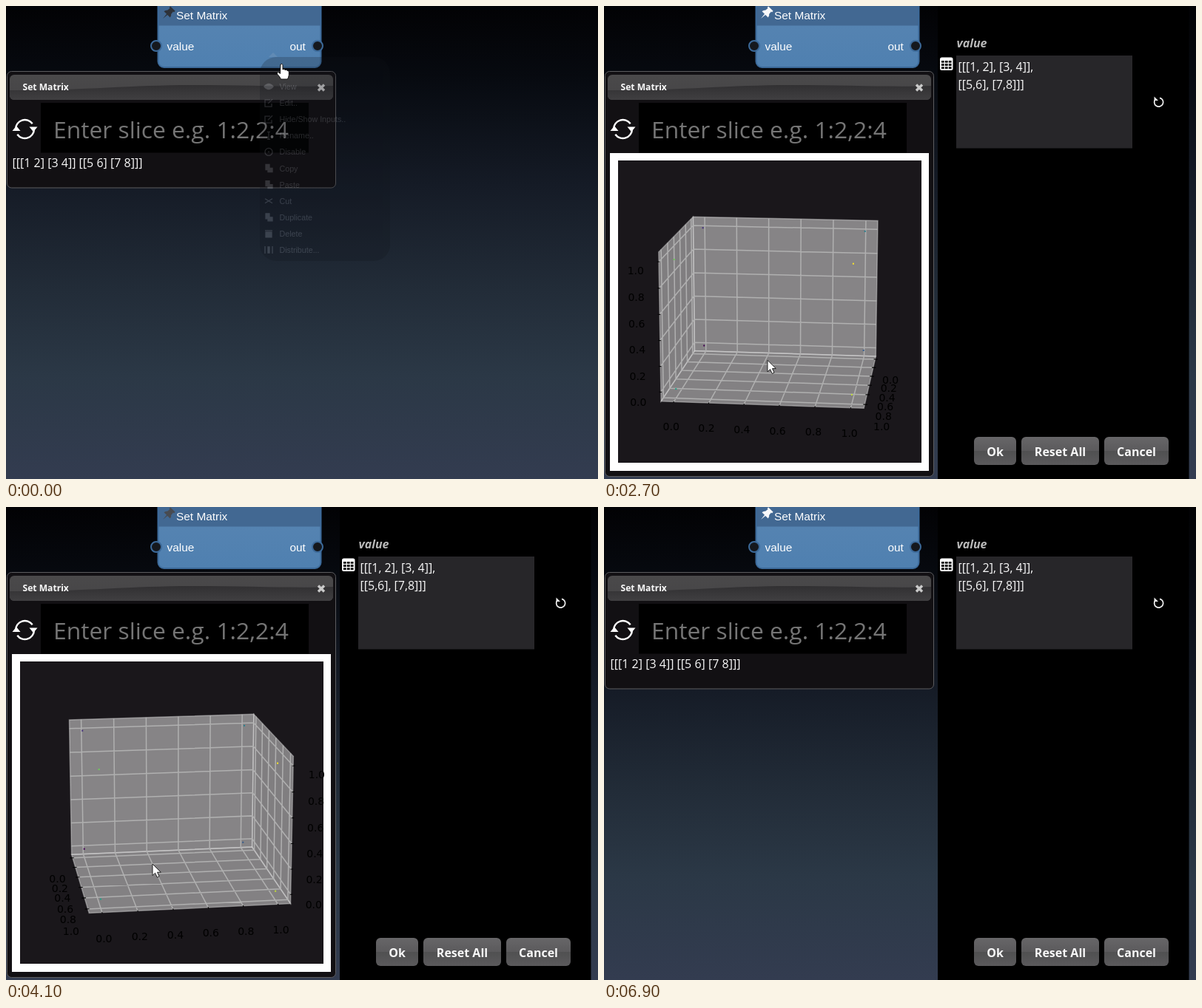
An HTML page that plays this animation: 800 px wide and 640 px high, repeating every 7000 ms.

```html
<!DOCTYPE html>
<html lang="en">
<head>
<meta charset="utf-8">
<title>Set Matrix</title>
<style>
html, body { margin: 0; width: 100%; height: 100%; overflow: hidden; background: #000; }
svg { display: block; width: 800px; height: 640px; }
text { white-space: pre; }
.ui { font: 16px "Open Sans", "Noto Sans", sans-serif; fill: #f8f8f8; }
.bold { font-weight: 700; }
.name { font-style: italic; fill: #b9b9b9; }
.node { font: 15.4px "Liberation Sans", Arial, sans-serif; fill: #fff; }
.menu { font: 10.7px "Liberation Sans", Arial, sans-serif; fill: #b4bac6; }
.tick { font: 14px "DejaVu Sans", sans-serif; fill: #000; text-anchor: middle; }
.mid { text-anchor: middle; }
</style>
</head>
<body>
<svg viewBox="0 0 800 640">
  <defs>
    <linearGradient id="sky" x2="0" y2="1">
      <stop stop-color="#020204"/><stop offset=".15" stop-color="#070a10"/>
      <stop offset=".38" stop-color="#151b26"/><stop offset=".6" stop-color="#222c38"/>
      <stop offset=".78" stop-color="#2b3846"/><stop offset="1" stop-color="#333c50"/>
    </linearGradient>
    <linearGradient id="body" x2="0" y2="1">
      <stop stop-color="#5985b2"/><stop offset="1" stop-color="#4f80b0"/>
    </linearGradient>
    <linearGradient id="bar" x2="0" y2="1">
      <stop stop-color="#4a494a"/><stop offset="1" stop-color="#464547"/>
    </linearGradient>
    <linearGradient id="shade" x2="0" y2="1">
      <stop stop-color="#313032"/><stop offset="1" stop-color="#403f41"/>
    </linearGradient>
    <linearGradient id="btn" x2="0" y2="1">
      <stop stop-color="#676668"/><stop offset=".5" stop-color="#5b5a5c"/>
      <stop offset=".5" stop-color="#505051"/><stop offset="1" stop-color="#5b5a5c"/>
    </linearGradient>
    <clipPath id="barClip"><rect x="5" y="93" width="437" height="34" rx="6"/></clipPath>
  </defs>

  <rect width="800" height="640" fill="url(#sky)"/>

  <g>
    <rect x="205.5" y="-12" width="220" height="95" rx="8" fill="url(#body)"/>
    <path d="M205.5 0h220v26.5h-220z" fill="#426892"/>
    <rect x="205.5" y="-12" width="220" height="95" rx="8" fill="none" stroke="#3c6a9a" stroke-width="2"/>
    <g fill="#15181d" stroke="#3c6a9a" stroke-width="2">
      <circle cx="203" cy="54" r="7"/><circle cx="421" cy="54" r="7"/>
    </g>
    <g id="pin" transform="translate(219 10) rotate(45) scale(.9)">
      <path d="M-5 -10H5V-7.5H3.4L4 -2.5Q6.5 -1 6.5 2.2H.9L0 11L-.9 2.2H-6.5Q-6.5 -1 -4 -2.5L-3.4 -7.5H-5Z"/>
    </g>
    <text class="node" x="230" y="17.5">Set Matrix</text>
    <text class="node" x="217.5" y="60">value</text>
    <text class="node" x="383.5" y="60">out</text>
  </g>

  <g>
    <rect id="frame" x="1.5" y="88.5" width="444" height="157.5" rx="6" fill="#121013" stroke="#5c5c5f"/>
    <g clip-path="url(#barClip)">
      <rect x="5" y="93" width="437" height="34" fill="url(#bar)"/>
      <path d="M5 114C110 114 170 107 250 107S390 110 442 108V127H5Z" fill="url(#shade)"/>
    </g>
    <text class="ui bold" x="22.5" y="114.3" style="font-size:12.1px">Set Matrix</text>
    <path d="M422 106.5l8 8m0-8l-8 8" stroke="#c9c9c9" stroke-width="3.4"/>
    <rect x="47" y="131" width="362" height="67.5" fill="#000"/>
    <text class="ui" x="64" y="178.5" style="font-size:31.8px;fill:#757575">Enter slice e.g. 1:2,2:4</text>
    <g id="refresh">
      <path d="M13 166.5A12.5 12.5 0 0 1 35.700 159.300M38 166.500A12.500 12.500 0 0 1 15.300 173.700" fill="none" stroke="currentColor" stroke-width="2.4"/>
      <path d="M8.500 169h11l-5.500-6.800zM31.500 163.500h11l-5.500 6.800z" fill="currentColor"/>
    </g>
    <text id="result" class="ui" x="8.5" y="218">[[[1 2] [3 4]] [[5 6] [7 8]]]</text>
    <g id="plot">
      <rect id="paper" x="8" y="199" width="431" height="430" fill="#fff"/>
      <rect x="19" y="209" width="410" height="409" fill="#1a171b"/>
    </g>
  </g>

  <g id="panel">
    <rect x="451" width="339.5" height="640"/>
    <text class="ui bold name" x="476.5" y="56">value</text>
    <rect x="476" y="67" width="238" height="125.5" fill="#272629"/>
    <text class="ui" x="478.5" y="87.5">[[[1, 2], [3, 4]],</text>
    <text class="ui" x="478.5" y="112">[[5,6], [7,8]]]</text>
    <rect x="454" y="69.5" width="17.5" height="17.5" rx="2.5" fill="#fff"/>
    <path id="cells"/>
    <path d="M745.5 125.8A6 6 0 1 0 751 124.300" fill="none" stroke="#eee" stroke-width="1.7"/>
    <path d="M743.5 122.5v5.500h5.500z" fill="#eee"/>
    <g id="buttons"></g>
  </g>

  <g id="menu">
    <rect x="343" y="69" width="176" height="276" rx="22" fill="#10131a"/>
    <path d="M355 69l6-6 6 6z" fill="#9fb0c8"/>
  </g>

  <g id="cursor">
    <path id="hand" d="M-2 -9Q0 -10.500 1 -8.500V-2Q3 -3.500 4 -1.500Q6 -2.500 7 -.5Q9 -1 9.300 1V5.500Q9 8 7.500 11H-1.500Q-3 7.500 -6.500 4Q-7.500 1.500 -5 1.500L-2.500 3.500Z" fill="#fff" stroke="#111"/>
    <path id="beam" d="M-4 -8.500Q0 -9 0 -7Q0 -9 4 -8.500M0 -7V7M-4 8.500Q0 9 0 7Q0 9 4 8.500" fill="none" stroke="#d8d8d8" stroke-width="1.6"/>
    <path id="arrow" d="M0 0V15.500L3.600 12.200L6.200 18L9 16.800L6.500 11.200H11.300Z" fill="#fff" stroke="#111" stroke-width=".9"/>
  </g>
</svg>
<script>
const LOOP = 7000, STEP = 100;
const $ = id => document.getElementById(id);

function add(parent, tag, attrs = {}, text) {
  const el = document.createElementNS(parent.namespaceURI, tag);
  for (const k in attrs) el.setAttribute(k, attrs[k]);
  if (text) el.textContent = text;
  return parent.appendChild(el);
}
const show = (el, on) => el.setAttribute('visibility', on ? 'visible' : 'hidden');

// Static parts made from short lists
[[500, 57, 'Ok'], [564, 105, 'Reset All'], [676, 87, 'Cancel']].forEach(([x, w, label]) => {
  add($('buttons'), 'rect', { x, y: 583, width: w, height: 38, rx: 6, fill: 'url(#btn)' });
  add($('buttons'), 'text', { x: x + w / 2, y: 608.5, class: 'ui bold mid' }, label);
});

let cells = '';
for (let i = 0; i < 9; i++) cells += `M${456 + i % 3 * 4.9} ${74 + (i / 3 | 0) * 4.1}h3.7v2.8h-3.7z`;
$('cells').setAttribute('d', cells);

const PEN = 'M2 -4H-5V5H4V1M-1 1L5 -5', SHEETS = 'M-4 -5H1V0H5V5H-1V2H-4Z';
[
  ['View', 'M-6 0Q0 -7 6 0Q0 7 -6 0Z'],
  ['Edit..', PEN],
  ['Hide/Show Inputs..', PEN],
  ['Rename..', 'M-2 -5H2M0 -5V5M-2 5H2'],
  ['Disable', 'M-5 0A5 5 0 1 0 5 0A5 5 0 1 0 -5 0M-1 0H1'],
  ['Copy', SHEETS],
  ['Paste', SHEETS],
  ['Cut', 'M-5 -3L5 3M-5 3L5 -3'],
  ['Duplicate', SHEETS],
  ['Delete', 'M-5 -4H5M-4 -2V5H4V-2ZM-1 -1V4M1 -1V4'],
  ['Distribute...', 'M-5 -5V5M5 -5V5M-1 -4H1V4H-1Z']
].forEach(([label, d], i) => {
  const y = 109 + i * 22.1, ink = '#b4bac6';
  add($('menu'), 'text', { x: 369.5, y: y + 4, class: 'menu' }, label);
  add($('menu'), 'path', { d, transform: `translate(355 ${y})`, fill: i > 4 || !i ? ink : 'none', stroke: ink, 'stroke-width': 1.3 });
});

// 3D plot: x points to the viewer, y to the right, z up
const PAD = 0.0729, LO = -PAD, HI = 1 + PAD;
const TICKS = [0, 0.2, 0.4, 0.6, 0.8, 1];
const VIRIDIS = ['#440154', '#46327e', '#365c8d', '#277f8e', '#1fa187', '#6ccd5a', '#c2df33', '#fde725'];
const plot = $('plot');
const panes = ['#f2f2f2', '#e6e6e6', '#ececec'].map(c =>
  add(plot, 'polygon', { fill: c, 'fill-opacity': 0.5, stroke: c, 'stroke-opacity': 0.4, 'stroke-width': 1.5 }));
const grid = add(plot, 'path', { fill: 'none', stroke: '#b0b0b0', 'stroke-width': 1.5 });
const marks = add(plot, 'path', { stroke: '#000', 'stroke-width': 1.1 });
const dots = VIRIDIS.map(fill => add(plot, 'rect', { width: 2, height: 2, fill }));
const labels = [0, 1, 2].map(() => TICKS.map(v => add(plot, 'text', { class: 'tick' }, v.toFixed(1))));

function camera(az, el) {
  const rad = Math.PI / 180;
  const sa = Math.sin(az * rad), ca = Math.cos(az * rad);
  const se = Math.sin(el * rad), ce = Math.cos(el * rad);
  return (x, y, z) => {
    const a = (x - 0.5) * 1.039, b = (y - 0.5) * 1.039, c = (z - 0.5) * 0.7793;
    const fwd = a * ca + b * sa;
    const k = 2210 / (10 - ce * fwd - se * c);
    return [229.5 + (b * ca - a * sa) * k, 407.7 - (ce * c - se * fwd) * k];
  };
}

function drawPlot(az, el) {
  const at = camera(az, el);
  const pt = p => at(...p).map(n => n.toFixed(2)).join(' ');
  const line = pts => 'M' + pts.map(pt).join('L');
  const zc = el > 0 ? LO : HI, zo = 1 - zc;
  const yc = az > 0 ? LO : HI, yo = 1 - yc;
  const zs = Math.sign(zc - 0.5), ys = Math.sign(yc - 0.5);

  [
    [[LO, LO, LO], [LO, HI, LO], [LO, HI, HI], [LO, LO, HI]],
    [[LO, yc, LO], [HI, yc, LO], [HI, yc, HI], [LO, yc, HI]],
    [[LO, LO, zc], [HI, LO, zc], [HI, HI, zc], [LO, HI, zc]]
  ].forEach((quad, i) => panes[i].setAttribute('points', quad.map(pt).join(' ')));

  let g = '', m = '';
  TICKS.forEach((v, i) => {
    g += line([[v, yo, zc], [v, yc, zc], [v, yc, zo]])
       + line([[HI, v, zc], [LO, v, zc], [LO, v, zo]])
       + line([[HI, yc, v], [LO, yc, v], [LO, yo, v]]);
    m += line([[v, yo + ys * 0.008, zc], [v, yo - ys * 0.016, zc]])
       + line([[HI - 0.008, v, zc], [HI + 0.016, v, zc]])
       + line([[HI, yc - ys * 0.004, v], [HI, yc + ys * 0.01, v]]);
    [
      [v, yo - ys * 0.096, zc + zs * 0.128],
      [HI + 0.09, v, zc + zs * 0.12],
      [HI + 0.108, yc + ys * 0.108, v]
    ].forEach((p, axis) => {
      const [x, y] = at(...p);
      labels[axis][i].setAttribute('x', x);
      labels[axis][i].setAttribute('y', y + 12);
    });
  });
  grid.setAttribute('d', g);
  marks.setAttribute('d', m);

  dots.forEach((dot, i) => {
    const [x, y] = at(i >> 2, i >> 1 & 1, i & 1);
    dot.setAttribute('x', x - 1);
    dot.setAttribute('y', y - 1);
  });
}

// Pointer path: time, x, y
const PATH = [
  [0, 373, 88], [100, 373, 88], [700, 296, 160], [1100, 22, 172], [1600, 19, 169],
  [1900, 19, 169], [2300, 221, 505], [2400, 221, 505], [3200, 221, 424], [4100, 198, 483],
  [4700, 223, 515], [4900, 223, 515], [5400, 34, 159], [5900, 34, 159], [6400, 64, 210], [6800, 536, 150]
];
const DRAG = [2400, 4700];
const clamp = (v, a, b) => Math.min(b, Math.max(a, v));

function pointer(t) {
  const i = PATH.findIndex(p => p[0] > t);
  if (i < 0) return PATH[PATH.length - 1].slice(1);
  const [t0, x0, y0] = PATH[i - 1], [t1, x1, y1] = PATH[i];
  const u = (t - t0) / (t1 - t0), e = u * u * (3 - 2 * u);
  return [x0 + (x1 - x0) * e, y0 + (y1 - y0) * e];
}

function render(t) {
  const [x, y] = pointer(t);
  const open = t >= 1700 && t < 6000;
  const inside = (a, b, c, d) => x > a && x < c && y > b && y < d;

  $('menu').setAttribute('opacity', 0.21 * clamp(1 - t / 200, 0, 1));
  $('panel').setAttribute('opacity', clamp((t - 150) / 300, 0, 1));

  const glow = (1 + Math.cos((t - 800) / 1000 * Math.PI)) / 2;
  const mix = (a, b) => Math.round(a + (b - a) * glow);
  $('pin').setAttribute('fill', `rgb(${mix(24, 255)},${mix(28, 255)},${mix(36, 255)})`);

  // The sheet gets slightly taller once the drag is over
  const extra = t > DRAG[1] ? 2 : 0;
  $('frame').setAttribute('height', open ? 548 + extra : 157.5);
  $('paper').setAttribute('height', 430 + extra);
  show($('result'), !open);
  show(plot, open);
  if (open) {
    const [dx, dy] = pointer(clamp(t, ...DRAG));
    drawPlot(6.8 + 0.66 * (dx - 221), 28 + 0.585 * (dy - 505));
  }

  $('refresh').setAttribute('color', inside(8, 148, 44, 184) ? '#5a8aba' : '#fff');
  const seen = t < 6800, hand = t < 300;
  const beam = !hand && (inside(47, 131, 409, 198) || inside(476, 67, 714, 192) || !open && inside(8, 202, 186, 222));
  show($('hand'), seen && hand);
  show($('beam'), seen && beam);
  show($('arrow'), seen && !hand && !beam);
  $('cursor').setAttribute('transform', `translate(${x} ${y})`);
}

const start = performance.now();
function tick() {
  const t = (performance.now() - start) % LOOP;
  render(Math.floor(t / STEP) * STEP);
  requestAnimationFrame(tick);
}
tick();
</script>
</body>
</html>
```
